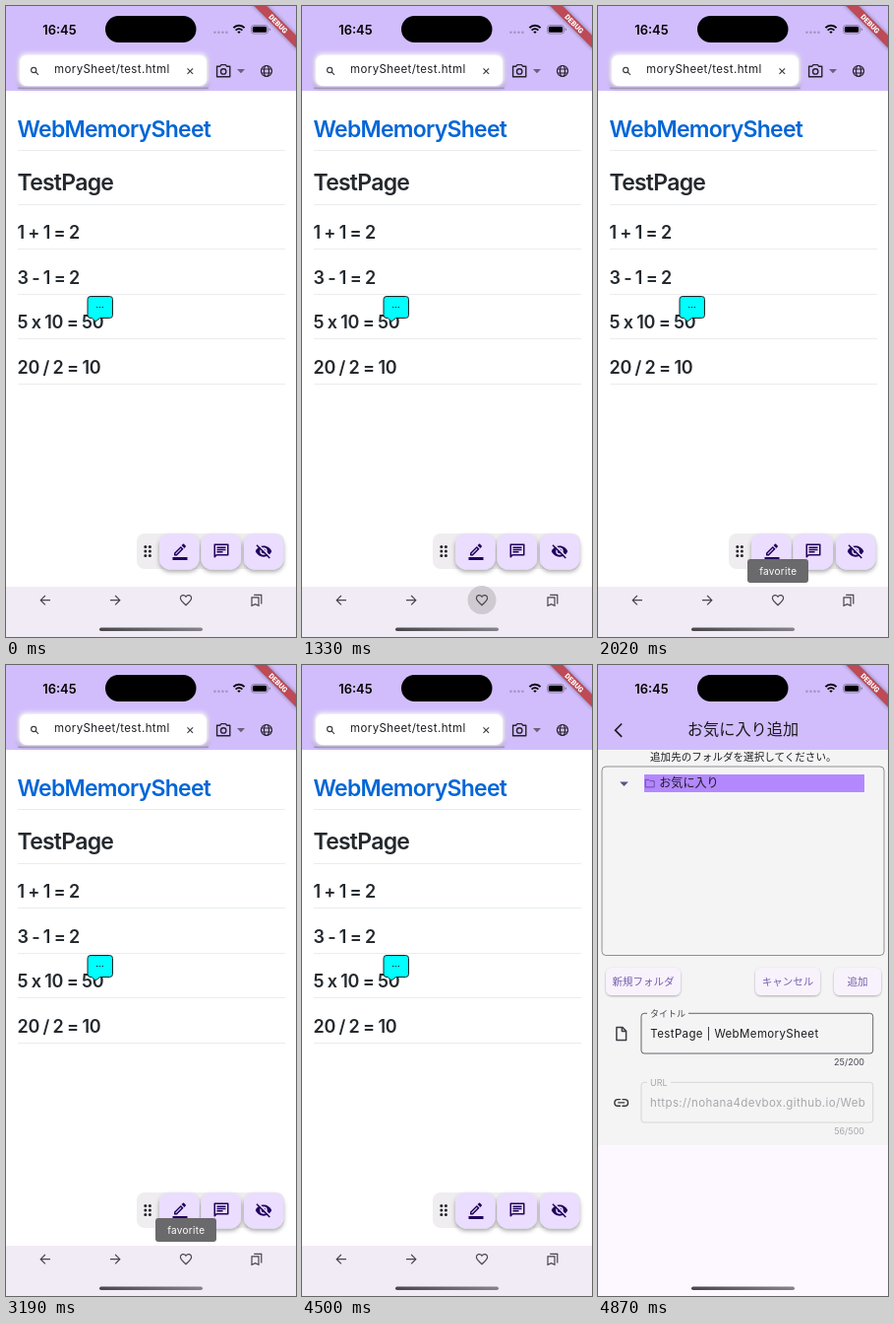
Write an HTML page that moves like this. It is 295 px wide and 640 px high and loops after 8 s.

```html
<!DOCTYPE html>
<html lang="ja">
<head>
<meta charset="utf-8">
<title>Adding a favorite</title>
<style>
  html, body { margin: 0; width: 100%; height: 100%; overflow: hidden; background: #fff; }
  svg { display: block; width: 100vw; height: 100vh; }
  text { font-family: Inter, "Noto Sans CJK JP", "Noto Sans CJK", sans-serif; white-space: pre; }
  .line { fill: none; stroke-linecap: round; stroke-linejoin: round; }
  .sharp { fill: none; }
  .head { font-size: 23px; font-weight: 600; letter-spacing: -.75px; }
  .sum { font-size: 18px; font-weight: 600; letter-spacing: -.3px; word-spacing: -.7px; fill: #24292e; }
  .input { font-size: 11.5px; letter-spacing: .38px; }
  .jp { font-size: 10.5px; }
  .small { font-size: 9px; }
</style>
</head>
<body>
<svg viewBox="0 0 295 640" preserveAspectRatio="none">
  <defs>
    <filter id="soft" x="-20%" y="-40%" width="140%" height="180%"><feGaussianBlur stdDeviation="2"/></filter>
    <filter id="drop" x="-30%" y="-30%" width="160%" height="170%">
      <feDropShadow dx="0" dy="2.4" stdDeviation="2" flood-color="#000" flood-opacity=".34"/>
    </filter>
    <filter id="lift" x="-20%" y="-30%" width="140%" height="170%">
      <feDropShadow dx="0" dy="1" stdDeviation=".9" flood-color="#000" flood-opacity=".3"/>
    </filter>
    <linearGradient id="handle">
      <stop stop-color="#49464c"/><stop offset="1" stop-color="#85828a"/>
    </linearGradient>
    <clipPath id="addressClip"><rect x="50" y="50" width="120" height="30"/></clipPath>
    <clipPath id="fieldClip"><rect x="52" y="430" width="220" height="30"/></clipPath>
  </defs>

  <g id="browser">
    <rect width="295" height="640" fill="#fff"/>
    <rect width="295" height="86" fill="#d1bdfc"/>

    <!-- address bar -->
    <rect x="12" y="50" width="194" height="34" rx="6" fill="#6f6388" opacity=".5" filter="url(#soft)"/>
    <rect x="12" y="48" width="194" height="34" rx="8" fill="#fff" filter="url(#soft)"/>
    <rect x="14" y="50" width="190" height="31" rx="7" fill="#fff"/>
    <path d="M12 83.2H206" stroke="#857b95" stroke-width=".8"/>
    <g class="sharp" stroke="#3c3840" stroke-width="1.1">
      <circle cx="28.2" cy="65" r="2.6"/>
      <path d="M30.2 67L33 69.8M184.5 63.3l5.6 5.6m0-5.6l-5.6 5.6"/>
    </g>
    <text class="input" x="166.6" y="68" text-anchor="end" fill="#1d1b20" clip-path="url(#addressClip)">morySheet/test.html</text>
    <g class="line" stroke="#26222c" stroke-width="1.4">
      <path d="M214.6 61.2h3.2l1.2-1.6h4.4l1.2 1.6h3.2v10.6h-13.2z"/>
      <circle cx="221.2" cy="66.4" r="2.7"/>
    </g>
    <path d="M235 64h8l-4 4.2z" fill="#6a6078"/>
    <g class="sharp" stroke="#26222c" stroke-width="1.2">
      <circle cx="265" cy="66" r="5.5"/>
      <ellipse cx="265" cy="66" rx="2.5" ry="5.5"/>
      <path d="M259.9 64h10.2M259.9 68h10.2"/>
    </g>

    <!-- page -->
    <text class="head" x="11.5" y="133" fill="#0366d6">WebMemorySheet</text>
    <text class="head" x="11.5" y="187" fill="#24292e">TestPage</text>
    <g id="sums"></g>
    <path id="rules" stroke="#ebecef" stroke-width="1"/>
    <path d="M86 294.5H105.5a3 3 0 0 1 3 3V313.5a3 3 0 0 1-3 3H95.6L90.8 320.2L87.4 316.5H86a3 3 0 0 1-3-3V297.5a3 3 0 0 1 3-3z" fill="#00ffff" stroke="#222"/>
    <path d="M92 305.5h1.3m1.5 0h1.3m1.5 0h1.3" stroke="#222" stroke-width="1.1"/>

    <!-- floating tools -->
    <rect x="133" y="535" width="150" height="36" rx="8" fill="#efedf0"/>
    <g id="dots" fill="#26222c"></g>
    <g id="tools" fill="#eaddff" filter="url(#drop)"></g>
    <g transform="translate(168 544) scale(.75)" fill="#21005d">
      <path d="M16.8 8.9L13.1 5.2L4 14.25V18h3.75zM6 16v-.9l7.1-7.1l.9.9L6.9 16zM19.7 6c.4-.4.4-1 0-1.4l-2.3-2.3c-.4-.4-1-.4-1.4 0l-1.9 1.8l3.8 3.8zM2 20h20v4H2z"/>
    </g>
    <g transform="translate(210 544) scale(.75)">
      <path d="M3 3H21V17H5.6L3 19.6z" fill="none" stroke="#21005d" stroke-width="2" stroke-linejoin="round"/>
      <path d="M6 7H18M6 10H18M6 13H14" stroke="#21005d" stroke-width="2"/>
    </g>
    <g transform="translate(253 544) scale(.75)">
      <path d="M1 12C2.7 7.6 7 4.5 12 4.5S21.3 7.6 23 12C21.3 16.4 17 19.5 12 19.5S2.7 16.4 1 12z" fill="#21005d"/>
      <circle cx="12" cy="12" r="4" fill="#21005d" stroke="#eaddff" stroke-width="2"/>
      <path d="M4 2.2L22 20.2" stroke="#eaddff" stroke-width="2"/>
      <path d="M2.6 3.6L20.4 21.4" stroke="#21005d" stroke-width="2"/>
    </g>

    <!-- bottom bar -->
    <rect y="589" width="295" height="51" fill="#f1ebf5"/>
    <circle id="ripple" cx="183" cy="602.5" r="14.5" fill="#cfcad2"/>
    <g class="sharp" stroke="#48444e" stroke-width="1.2">
      <path d="M45 602.7H35.2M39.9 598L35.2 602.7L39.9 607.4"/>
      <path d="M106 602.7H115.8M111.1 598L115.8 602.7L111.1 607.4"/>
      <path d="M183 607.7C179 604.2 177.4 602.6 177.4 600.5C177.4 597.4 181.3 596.4 183 599.2C184.7 596.4 188.6 597.4 188.6 600.5C188.6 602.6 187 604.2 183 607.7z"/>
      <path d="M250 599.8H257V608.2L253.5 606.6L250 608.2zM252.2 597.4H259.8V606.6"/>
    </g>
    <g id="tooltip">
      <rect x="152" y="561" width="62" height="24" rx="3" fill="#6a696b"/>
      <text x="183.3" y="576.7" text-anchor="middle" font-size="10" letter-spacing=".3" fill="#fff">favorite</text>
    </g>
  </g>

  <g id="form">
    <rect width="295" height="640" fill="#fdf8ff"/>
    <rect y="86" width="295" height="401" fill="#f4f4f4"/>
    <rect width="295" height="86" fill="#d1bdfc"/>
    <path class="sharp" d="M24.2 59.5L17.6 66.2L24.2 72.9" stroke="#1d1b20" stroke-width="1.7"/>
    <text x="147.5" y="71.3" text-anchor="middle" font-size="16.2" fill="#1d1b20">お気に入り追加</text>
    <text class="jp" x="147.8" y="97.3" text-anchor="middle" letter-spacing=".06" fill="#1d1b20">追加先のフォルダを選択してください。</text>

    <!-- folder tree -->
    <rect x="4" y="103" width="287" height="191.5" rx="4" fill="none" stroke="#79757c" stroke-width=".8"/>
    <rect x="47" y="111" width="224" height="18" fill="#b388ff"/>
    <path d="M22.2 118.6h8.6l-4.3 4.4z" fill="#5c5188"/>
    <path class="line" d="M48.6 116.4h3.2l1.2 1.3h4.2v6.2h-8.6z" stroke="#6d4ba6" stroke-width="1"/>
    <text x="62.2" y="124.3" font-size="12.1" fill="#1d1b20">お気に入り</text>

    <g id="buttons"></g>

    <!-- title field -->
    <path class="line" d="M18.9 367.4h5.8l3.9 3.9v9.2h-9.7zM24.4 367.6v3.9h3.9" stroke="#3f3b45" stroke-width="1.5"/>
    <rect x="44" y="353.3" width="235.7" height="40.7" rx="3" fill="none" stroke="#444148" stroke-width=".8"/>
    <rect x="50" y="351" width="42" height="5" fill="#f4f4f4"/>
    <text class="small" x="53" y="356.6" fill="#49454f">タイトル</text>
    <text class="input" x="53.3" y="378" fill="#1d1b20">TestPage | WebMemorySheet</text>
    <text class="small" x="271" y="406.3" text-anchor="end" fill="#49454f">25/200</text>

    <!-- address field -->
    <g class="line" stroke="#343138" stroke-width="1.4">
      <path d="M22.4 440.6h-2.2a3.3 3.3 0 0 0 0 6.6h2.2M25 440.6h2.2a3.3 3.3 0 0 1 0 6.6H25M20.8 443.9h5.8"/>
    </g>
    <rect x="44" y="423.3" width="235.7" height="40.7" rx="3" fill="none" stroke="#cfcdd1" stroke-width=".8"/>
    <rect x="50" y="421" width="24" height="5" fill="#f4f4f4"/>
    <text class="small" x="53" y="427" fill="#a9a6ac">URL</text>
    <text class="input" x="53" y="448" fill="#a9a6ac" clip-path="url(#fieldClip)">https://nohana4devbox.github.io/Web</text>
    <text class="small" x="271" y="476.3" text-anchor="end" fill="#a9a6ac">56/500</text>

    <!-- last sliver of the page sliding away -->
    <g id="sliver">
      <rect y="295.5" width="1.4" height="16" fill="#3db5ff"/>
      <rect y="177" width="1" height="8" fill="#a5a5aa"/>
      <rect y="120" width="1" height="4" fill="#a5a5aa"/>
    </g>
  </g>

  <!-- status bar -->
  <text x="37.3" y="28.5" font-size="12.9" font-weight="600" fill="#000">16:45</text>
  <rect x="101" y="10" width="92.5" height="27" rx="13.5" fill="#000"/>
  <path d="M212.4 26.8h.1m3.9 0h.1m3.9 0h.1m3.9 0h.1" stroke="#a293c2" stroke-width="2.4" stroke-linecap="round"/>
  <g fill="none" stroke="#000" stroke-width="1.8">
    <path d="M231.4 22.2a7.6 7.6 0 0 1 11.2 0M233.6 24.6a4.7 4.7 0 0 1 6.8 0"/>
  </g>
  <path d="M235.3 26.2a2.5 2.5 0 0 1 3.4 0L237 28z"/>
  <rect x="249.5" y="19.5" width="17" height="8.6" rx="2.7" fill="none" stroke="#000" stroke-opacity=".4" stroke-width=".8"/>
  <rect x="250.8" y="20.8" width="14.4" height="6" rx="1.6"/>
  <path d="M267.8 22.3v3a1.6 1.6 0 0 0 0-3z" fill-opacity=".5"/>

  <!-- corner banner -->
  <g transform="translate(295 0) rotate(45)">
    <rect x="-34" y="21" width="68" height="9" fill="#000" opacity=".4" filter="url(#soft)"/>
    <rect x="-34" y="21" width="68" height="9" fill="#bd4a56"/>
    <text y="28.2" text-anchor="middle" font-size="7.4" font-weight="900" style="font-family:Roboto,sans-serif" fill="#fff">DEBUG</text>
  </g>

  <rect x="95" y="630.5" width="105" height="3.6" rx="1.8" fill="url(#handle)"/>
</svg>
<script>
  const LOOP = 8000;
  const el = id => document.getElementById(id);
  const clamp = v => Math.max(0, Math.min(1, v));

  el("sums").innerHTML = ["1 + 1 = 2", "3 - 1 = 2", "5 x 10 = 50", "20 / 2 = 10"]
    .map((sum, i) => `<text class="sum" x="11.5" y="${236 + i * 45.6}">${sum}</text>`).join("");

  el("rules").setAttribute("d", [146.5, 201.5, 246.5, 292.5, 337.5, 383.5]
    .map(y => `M12 ${y}H284`).join(""));

  el("dots").innerHTML = [0, 1, 2, 3, 4, 5]
    .map(i => `<circle cx="${141.8 + i % 2 * 4.6}" cy="${548.4 + (i >> 1) * 4.6}" r="1.5"/>`).join("");

  el("tools").innerHTML = [156, 198.5, 242]
    .map(x => `<rect x="${x}" y="535" width="40.5" height="36.5" rx="11"/>`).join("");

  el("buttons").innerHTML = [[8, 76, "新規フォルダ"], [160, 66, "キャンセル"], [240, 48, "追加"]]
    .map(([x, w, label]) => `
      <rect x="${x}" y="307" width="${w}" height="28" rx="6" fill="#f8f2fc" filter="url(#lift)"/>
      <text class="jp" x="${x + w / 2}" y="324.8" text-anchor="middle" fill="#7560ad">${label}</text>`).join("");

  const show = (id, on) => el(id).setAttribute("visibility", on ? "inherit" : "hidden");

  function draw(t) {
    const formOpen = t >= 4610;
    el("browser").setAttribute("visibility", formOpen ? "hidden" : "visible");
    el("form").setAttribute("visibility", formOpen ? "visible" : "hidden");
    show("sliver", t < 4870);
    show("tooltip", t >= 1450 && t < 3370);
    el("ripple").setAttribute("opacity", t < 1450 ? clamp((t - 940) / 200) : 0);
  }

  const start = performance.now();
  function tick() {
    draw((performance.now() - start) % LOOP);
    requestAnimationFrame(tick);
  }
  tick();
</script>
</body>
</html>
```
